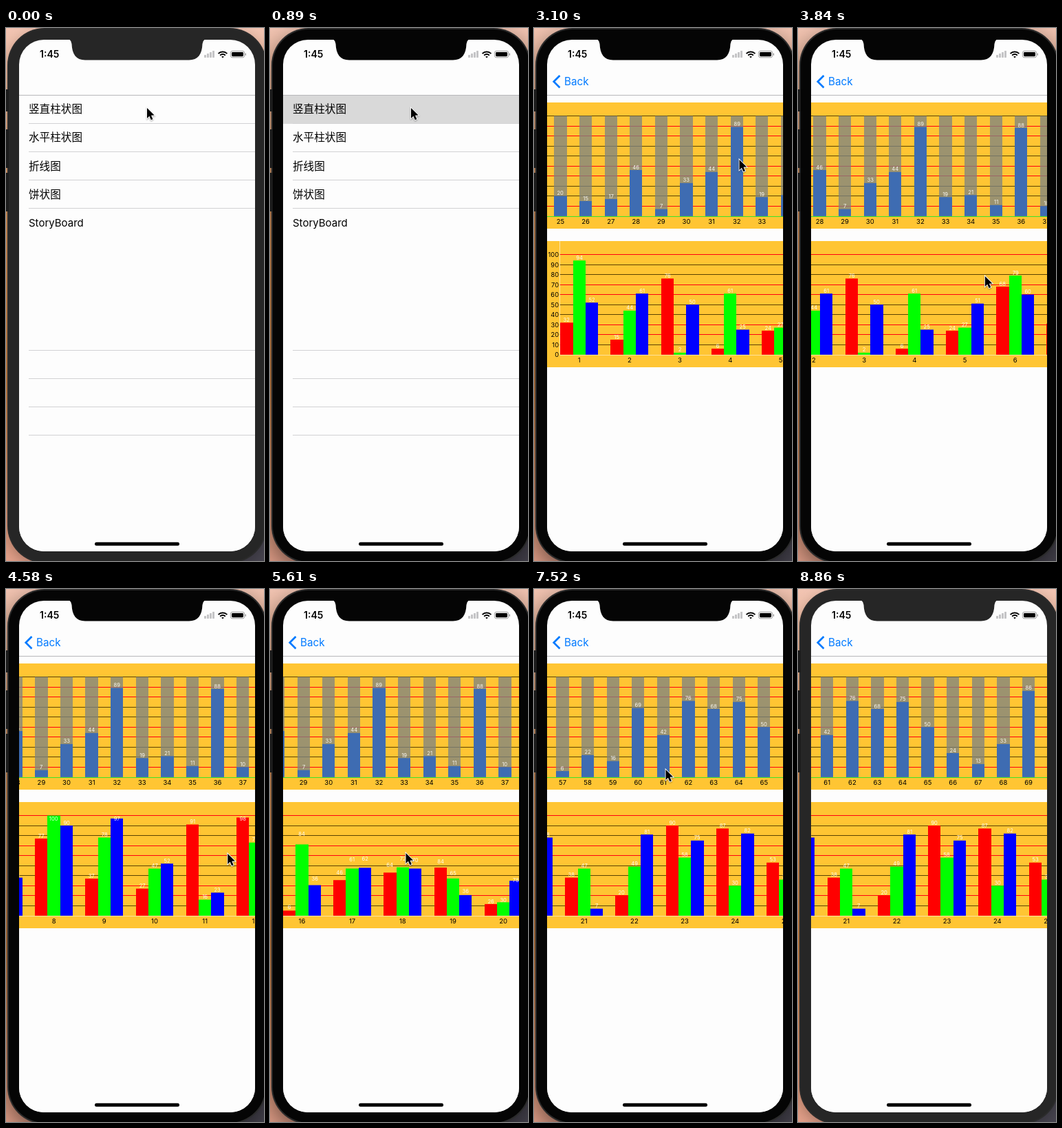
An HTML page with a canvas that plays this animation: 375x773 px, repeating every 8960 ms.

```html
<!DOCTYPE html>
<html lang="zh">
<head>
<meta charset="utf-8">
<style>
html, body { margin: 0; width: 100%; height: 100%; overflow: hidden; }
canvas { display: block; }
</style>
</head>
<body>
<canvas id="stage" width="375" height="773"></canvas>
<script>
const ctx = document.getElementById('stage').getContext('2d');
const LOOP = 8960, STEP = 147.4;
const LEFT = 19, RIGHT = 362, WIDTH = RIGHT - LEFT;
const SANS = 'Inter, "Noto Sans CJK SC", "Noto Sans CJK", sans-serif';
const PAPER = '#fdfdfd', GOLD = '#ffc533', RED = '#ff0010', DARK = '#5c4300';
const BAR = 18.3, ORIGIN = 38.2, HEIGHT = 145.3, PANEL = 183;
const APPEAR = 1.03, GROW = 0.4, FRICTION = 2.55;

const clamp = v => Math.max(0, Math.min(1, v));
const smooth = p => p * p * (3 - 2 * p);

// flicks: [start, resting offset]; known: values from a given column on, the rest is random.
const charts = [
  {
    top: 108, base: 272.8, period: 2 * BAR, ahead: 800, phase: 3, axis: '#3be32c',
    colors: ['#3e6cb2'], track: 'rgba(126,132,130,.76)',
    flicks: [[1.95, 566], [2.6, 1023.7], [6.25, 1652], [7, 2206]],
    known: {
      1: [92, 17, 100, 88, 75, 50, 54, 72, 66],
      25: [20, 15, 17, 46, 7, 33, 44, 89, 19, 21, 11, 88, 10],
      57: [6, 22, 16, 69, 42, 76, 68, 75, 50, 24, 13, 33, 86]
    }
  },
  {
    top: 309, base: 473.8, period: 4 * BAR, ahead: 540, phase: 1, axis: 'rgba(255,255,255,.5)',
    colors: ['#f00', '#0f0', '#00f'],
    flicks: [[3.75, 579], [5.236, 1459.5]],
    known: {
      1: [32, 94, 52, 15, 44, 61, 76, 2, 50, 6, 61, 25, 24, 27],
      8: [77, 100, 90, 37, 78, 97, 27, 47, 52, 91, 16, 23, 98, 73],
      21: [38, 47, 7, 20, 49, 81, 90, 58, 75, 87, 30, 82, 53, 36]
    }
  }
];

// Resting places of the pointer: [time, x, y].
const stops = [[0.95, 205, 116], [1.77, 245, 177], [3.1, 298.5, 191], [4.575, 322.5, 384],
  [5.61, 197.5, 383], [7.53, 191.5, 262], [8.42, 230, 722]];

// Each flick pulls the offset towards its resting place with friction.
const scrollAt = (c, t) => c.flicks.reduce(
  (s, [start, to]) => t < start ? s : to + (s - to) * Math.exp(FRICTION * (start - t)), 0);

// The offset a flick starts from keeps gliding, so nested flicks blend.
function offset(c, t) {
  let s = 0, rest = 0;
  for (const [start, to] of c.flicks) {
    if (t < start) break;
    s += (to - s) * (1 - Math.exp(FRICTION * (start - t)));
  }
  return s;
}

const centre = (c, n, t) =>
  ORIGIN + BAR * c.colors.length / 2 + (n - 1) * c.period - offset(c, t);

function valueOf(c, n, j) {
  const m = c.colors.length;
  for (const first in c.known) {
    const v = c.known[first][(n - first) * m + j];
    if (v !== undefined) return v;
  }
  const r = Math.sin(n * 12.99 + j * 78.23 + m) * 43758.5;
  return Math.floor((r - Math.floor(r)) * 100) + 1;
}

// Cells are prepared shortly before they scroll into view, then grow.
for (const c of charts) {
  c.born = [];
  for (let n = 1, t = APPEAR; n < 100; n++) {
    while (t < 9 && centre(c, n, t) > c.ahead) t += 0.01;
    c.born[n] = t;
  }
}

function rect(x, y, w, h, fill) {
  ctx.fillStyle = fill;
  ctx.fillRect(x, y, w, h);
}

function round(x, y, w, h, r, fill) {
  ctx.beginPath();
  ctx.roundRect(x, y, w, h, r);
  ctx.fillStyle = fill;
  ctx.fill();
}

function text(str, x, y, size, fill = '#000', align = 'left', weight = 400) {
  ctx.font = `${weight} ${size}px ${SANS}`;
  ctx.textAlign = align;
  ctx.textBaseline = 'middle';
  ctx.fillStyle = fill;
  ctx.fillText(str, x, y + size * 0.04);
}

function drawCell(c, n, x, t) {
  const { base, colors } = c;
  const p = clamp((t - c.born[n]) / GROW);
  const edge = j => Math.round(x + (j - colors.length / 2) * BAR);
  const heights = colors.map((_, j) => valueOf(c, n, j) / 100 * HEIGHT);
  heights.forEach((h, j) => {
    const w = edge(j + 1) - edge(j);
    if (c.track) rect(edge(j), base - HEIGHT, w, HEIGHT, c.track);
    rect(edge(j), base - h * p, w, h * p, colors[j]);
  });
  heights.forEach((h, j) => {
    const y = Math.max(base - h * smooth(p) - 4, base - HEIGHT + 4.5);
    text(valueOf(c, n, j), edge(j) + BAR / 2, y, 7.6, 'rgba(255,255,255,.92)', 'center');
  });
  text(n, x, base + 8, 9.5, '#000', 'center');
}

function drawChart(c, t) {
  const { top, base } = c;
  const axis = ORIGIN - 0.7 - offset(c, t);
  const start = Math.max(LEFT, axis);
  ctx.save();
  ctx.beginPath();
  ctx.rect(LEFT, top, WIDTH, PANEL);
  ctx.clip();
  rect(LEFT, top, WIDTH, PANEL, GOLD);
  for (let i = 0; i < 10; i++) {
    const y = Math.round(base - HEIGHT * (1 - i / 10) - 0.5);
    rect(start, y, WIDTH, 1, (i + c.phase) % 4 < 2 ? RED : DARK);
  }
  if (axis > -40) {
    rect(axis - 0.5, top, 1, base - top, 'rgba(255,255,255,.55)');
    for (let v = 0; v <= 100; v += 10)
      text(v, axis - 1.5, base - v / 100 * HEIGHT + 0.5, 9.3, '#000', 'right');
  }
  for (let n = 1; n < 100; n++) {
    const x = centre(c, n, t);
    if (x > LEFT - 40 && x < RIGHT + 40) drawCell(c, n, x, t);
  }
  rect(start, Math.round(base - 0.3), WIDTH, 1, c.axis);
  ctx.restore();
}

function drawList(pressed) {
  rect(LEFT, 98, WIDTH, 662, PAPER);
  if (pressed) rect(LEFT, 98, WIDTH, 41, '#d9d9d9');
  ['竖直柱状图', '水平柱状图', '折线图', '饼状图', 'StoryBoard'].forEach((label, i) =>
    text(label, 33, 118 + i * 41.1, i < 4 ? 15.6 : 15));
  for (let row = 1; row <= 12; row++)
    if (row < 5 || row > 8) rect(33, Math.floor(97.4 + row * 41.1), 329, 1, '#d2d2d4');
}

function drawBack(alpha, shift) {
  ctx.save();
  ctx.globalAlpha = alpha;
  ctx.strokeStyle = '#007aff';
  ctx.lineWidth = 2.7;
  ctx.beginPath();
  ctx.moveTo(37.5, 69);
  ctx.lineTo(28.7, 77.7);
  ctx.lineTo(37.5, 86.5);
  ctx.stroke();
  text('Back', 44 + shift, 77.7, 15.2, '#007aff');
  ctx.restore();
}

function drawStatus() {
  text('1:45', 49, 38, 14, '#000', 'left', 600);
  for (let i = 0; i < 4; i++) round(288 + i * 4, 39 - i * 2, 3, 4 + i * 2, 0.8, '#c4c4c6');
  ctx.save();
  ctx.beginPath();
  ctx.moveTo(315, 43.5);
  ctx.arc(315, 43.5, 11, -2.36, -0.78);
  ctx.clip();
  ctx.strokeStyle = '#000';
  ctx.lineWidth = 2;
  for (const r of [1.5, 5.4, 9]) {
    ctx.beginPath();
    ctx.arc(315, 43.5, r, Math.PI, 0);
    ctx.stroke();
  }
  ctx.restore();
  ctx.lineWidth = 0.8;
  ctx.strokeStyle = '#8a8a8a';
  ctx.beginPath();
  ctx.roundRect(326.4, 33.4, 20.2, 9.4, 2.6);
  ctx.stroke();
  round(328, 35, 17, 6.2, 1.4, '#000');
  round(347.6, 36.4, 1.2, 3.4, 0.6, '#8a8a8a');
}

function drawDesk() {
  const g = ctx.createLinearGradient(0, 0, 0, 773);
  ['#f3c5b3', '#d9955c', '#c98246', '#e3a08a'].forEach((color, i) => g.addColorStop(i / 3, color));
  rect(0, 0, 375, 773, g);
  rect(330, 720, 45, 53, '#47444f');
}

function drawPhone(active) {
  const body = active ? '#050505' : '#262626';
  ctx.save();
  ctx.shadowColor = `rgba(0,0,0,${active ? 0.5 : 0.25})`;
  ctx.shadowBlur = active ? 36 : 20;
  ctx.shadowOffsetY = active ? 12 : 6;
  round(2, 0, 377, 776, 54, '#2b2b2b');
  ctx.restore();
  for (const [y, h] of [[89, 32], [147, 56], [210, 56]]) rect(0, y, 4, h, '#1c1c1c');
  round(4, 2, 373, 772, 52, body);
  return body;
}

function drawNotch(body) {
  ctx.fillStyle = body;
  ctx.beginPath();
  ctx.moveTo(90, 16);
  ctx.quadraticCurveTo(95, 17, 95.5, 23);
  ctx.bezierCurveTo(96, 38, 102, 46.5, 115, 46.5);
  ctx.lineTo(266, 46.5);
  ctx.bezierCurveTo(279, 46.5, 285, 38, 285.5, 23);
  ctx.quadraticCurveTo(286, 17, 291, 16);
  ctx.fill();
}

// The pointer eases between its stops and sweeps right to left at every flick.
function pointerAt(t) {
  let i = 0;
  while (i < stops.length - 2 && stops[i + 1][0] <= t) i++;
  const [t0, x0, y0] = stops[i], [t1, x1, y1] = stops[i + 1];
  const p = 1 - (1 - clamp((t - t0) / (t1 - t0))) ** 3;
  let x = x0 + (x1 - x0) * p;
  for (const [start] of charts.flatMap(c => c.flicks)) {
    const s = (t - start) / 0.3;
    if (Math.abs(s) < 1) x -= 60 * Math.sin(Math.PI * s);
  }
  return [x, y0 + (y1 - y0) * p];
}

function drawPointer(t) {
  ctx.save();
  ctx.translate(...pointerAt(t));
  ctx.beginPath();
  [[0, 0], [0, 15], [3.4, 11.8], [5.8, 17.3], [8.4, 16.2], [6, 10.8], [10.6, 10.6]]
    .forEach(([x, y]) => ctx.lineTo(x, y));
  ctx.closePath();
  ctx.lineWidth = 1.8;
  ctx.strokeStyle = '#fff';
  ctx.shadowColor = 'rgba(0,0,0,.35)';
  ctx.shadowBlur = 2;
  ctx.shadowOffsetY = 1;
  ctx.stroke();
  ctx.shadowColor = 'transparent';
  ctx.fillStyle = '#000';
  ctx.fill();
  ctx.restore();
}

function draw(t) {
  const active = t > 0.1 && t < 8.5;
  const push = 1 - (1 - clamp((t - 0.95) / 0.36)) ** 2;
  drawDesk();
  const body = drawPhone(active);
  ctx.save();
  ctx.beginPath();
  ctx.roundRect(LEFT, 17, WIDTH, 742, 36);
  ctx.clip();
  rect(LEFT, 17, WIDTH, 742, PAPER);
  if (push < 1) {
    ctx.save();
    ctx.translate(-push * WIDTH * 0.3, 0);
    drawList(t > 0.8);
    ctx.restore();
  }
  if (push > 0) {
    ctx.save();
    ctx.translate((1 - push) * WIDTH, 0);
    rect(LEFT, 98, WIDTH, 662, PAPER);
    charts.forEach(c => drawChart(c, t));
    ctx.restore();
    drawBack(push, (1 - push) * 100);
  }
  rect(LEFT, 97, WIDTH, 1, '#b8b8ba');
  drawStatus();
  drawNotch(body);
  round(129, 745.8, 123, 5, 2.5, '#000');
  ctx.restore();
  if (t < 8.42) drawPointer(t);
}

function tick() {
  draw(Math.floor(performance.now() % LOOP / STEP) * 0.1476);
  requestAnimationFrame(tick);
}
tick();
</script>
</body>
</html>
```
